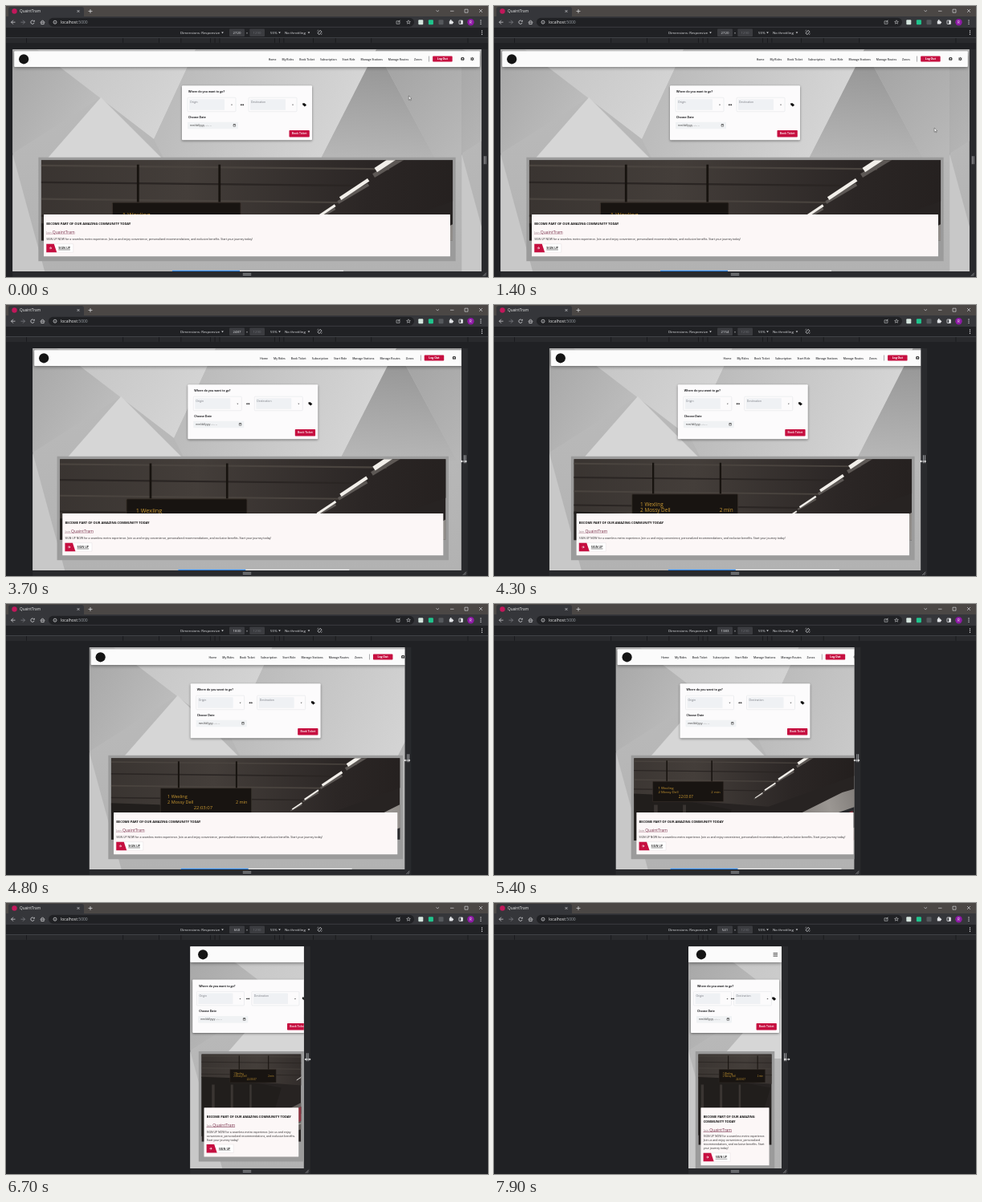
An HTML page with a canvas for the animation above (8000 ms loop, 600 by 338 pixels).

```html
<!DOCTYPE html>
<html lang="en">
<head>
<meta charset="utf-8">
<title>Responsive page preview</title>
<style>
html, body { margin: 0; width: 100%; height: 100%; overflow: hidden; background: #202124; }
canvas { display: block; width: 600px; height: 338px; }
</style>
</head>
<body>
<canvas id="stage"></canvas>
<script>
const BRAND = 'QuaintTram';
const LOOP = 8000, STEP = 100, SCALE = 0.2146, LAG = 150;
const RED = '#c60f40', INK = '#1c1c1f', ICON = '#e2e4e7';
const SANS = '"Open Sans", "Noto Sans", sans-serif';
const canvas = document.getElementById('stage');
const c = canvas.getContext('2d');
const ratio = Math.max(1, window.devicePixelRatio || 1);
canvas.width = 600 * ratio;
canvas.height = 338 * ratio;

const clamp = (v, lo = 0, hi = 1) => Math.min(hi, Math.max(lo, v));
const mix = (a, b, u) => a + (b - a) * u;

// Smooth curve through [time, value] keys, at rest at both ends.
function curve(keys, t) {
  const n = keys.length - 1;
  if (t <= keys[0][0]) return keys[0][1];
  if (t >= keys[n][0]) return keys[n][1];
  const slope = i => i === 0 || i === n ? 0
    : (keys[i + 1][1] - keys[i - 1][1]) / (keys[i + 1][0] - keys[i - 1][0]);
  const i = keys.findIndex(k => k[0] > t) - 1;
  const [a, p] = keys[i], [b, q] = keys[i + 1];
  const h = b - a, u = (t - a) / h, v = 1 - u;
  return p * v * v * (1 + 2 * u) + q * u * u * (1 + 2 * v)
    + h * u * v * (v * slope(i) - u * slope(i + 1));
}

function rect(x, y, w, h, fill, r = 0) {
  c.fillStyle = fill;
  c.beginPath();
  c.roundRect(x, y, w, h, r);
  c.fill();
}
function frame(x, y, w, h, color, lw = 0.5, r = 0) {
  c.strokeStyle = color;
  c.lineWidth = lw;
  c.beginPath();
  c.roundRect(x, y, w, h, r);
  c.stroke();
}
function disc(x, y, r, fill) {
  c.fillStyle = fill;
  c.beginPath();
  c.arc(x, y, r, 0, Math.PI * 2);
  c.fill();
}
function ring(x, y, r, color, from = 0, to = Math.PI * 2) {
  c.strokeStyle = color;
  c.lineWidth = 0.7;
  c.beginPath();
  c.arc(x, y, r, from, to);
  c.stroke();
}
function poly(points, fill) {
  c.fillStyle = fill;
  c.beginPath();
  points.forEach(([x, y]) => c.lineTo(x, y));
  c.closePath();
  c.fill();
}
function line(points, color, lw = 0.7) {
  c.strokeStyle = color;
  c.lineWidth = lw;
  c.beginPath();
  points.forEach(([x, y]) => c.lineTo(x, y));
  c.stroke();
}
function arrow(x, y, r, dir, color) {
  line([[x - r, y], [x + r, y]], color);
  const tip = x + r * dir, back = tip - r * dir;
  line([[back, y - r], [tip, y], [back, y + r]], color);
}
function cross(x, y, r, color) {
  line([[x - r, y - r], [x + r, y + r]], color, 0.6);
  line([[x + r, y - r], [x - r, y + r]], color, 0.6);
}
function caret(x, y, color, r = 1.3) {
  poly([[x - r, y - r / 2], [x + r, y - r / 2], [x, y + r * 0.8]], color);
}
function dots(x, y) {
  for (const d of [-2.2, 0, 2.2]) disc(x, y + d, 0.65, ICON);
}
function grad(x0, y0, x1, y1, ...stops) {
  const g = c.createLinearGradient(x0, y0, x1, y1);
  stops.forEach((s, i) => g.addColorStop(i / (stops.length - 1), s));
  return g;
}
function font(size, weight = 400) {
  c.font = `${weight} ${size}px ${SANS}`;
}
function text(s, x, y, size, color, weight = 400, align = 'left') {
  font(size, weight);
  c.textAlign = align;
  c.fillStyle = color;
  c.fillText(s, x, y + size * 0.36);
  return c.measureText(s).width;
}
function shadowed(blur, draw) {
  c.save();
  c.shadowColor = 'rgba(0,0,0,.45)';
  c.shadowBlur = blur * ratio;
  c.shadowOffsetY = ratio;
  draw();
  c.restore();
}
function clipped(x, y, w, h, draw) {
  c.save();
  c.beginPath();
  c.rect(x, y, w, h);
  c.clip();
  draw();
  c.restore();
}
function wrap(s, width, size, weight) {
  font(size, weight);
  const lines = [];
  let row = '';
  for (const word of s.split(' ')) {
    const next = row ? row + ' ' + word : word;
    if (row && c.measureText(next).width > width) {
      lines.push(row);
      row = word;
    } else row = next;
  }
  return [...lines, row];
}

function tabStrip() {
  rect(0, 0, 600, 14, '#4b4745');
  rect(3, 1, 94, 16, '#35363a', 3);
  disc(10.5, 6.5, 3.2, '#c2185b');
  text(BRAND, 17, 6.5, 4.7, '#eceded');
  cross(90, 6.5, 1.5, ICON);
  line([[102.5, 6.5], [107.5, 6.5]], ICON);
  line([[105, 4], [105, 9]], ICON);
  line([[535.5, 5.3], [537.2, 7], [539, 5.3]], ICON, 0.6);
  line([[553, 6.3], [557.5, 6.3]], ICON, 0.6);
  frame(571, 4.2, 4, 4, ICON, 0.6);
  cross(591, 6, 2, ICON);
}

function addressBar() {
  const y = 20.2;
  rect(0, 13, 600, 14, '#35363a');
  rect(53, 14.7, 455, 11, '#202124', 5.5);
  arrow(9, y, 2.5, -1, ICON);
  arrow(21, y, 2.5, 1, '#85878b');
  ring(33, y, 2.2, ICON, 0.3, 5.4);
  poly([[33.7, y - 0.8], [35.6, y - 0.8], [35.6, y - 2.8]], ICON);
  line([[42.8, y + 0.3], [45.5, y - 2.4], [48.2, y + 0.3]], ICON);
  frame(43.8, y, 3.4, 2.4, ICON, 0.7);
  ring(61, y, 2, ICON);
  line([[61, y - 0.3], [61, y + 1.2]], ICON, 0.5);
  const w = text('localhost', 68, y, 5, '#f1f1f1');
  text(':5000', 68 + w, y, 5, '#9aa0a6');
  frame(486, y - 1.4, 4, 3.5, ICON);
  line([[488, y + 0.4], [490.5, y - 2.5]], ICON, 0.6);
  const star = Array.from({ length: 11 }, (_, i) => {
    const a = i * Math.PI / 5 - Math.PI / 2, r = i % 2 ? 1.1 : 2.5;
    return [501 + r * Math.cos(a), y + r * Math.sin(a)];
  });
  line(star, ICON, 0.5);
  ['#d5e5de', '#20c58d', '#55585c'].forEach((fill, i) => rect(513.3 + i * 12.6, 17.2, 6, 6, fill, 1));
  rect(551.8, 18.5, 4.2, 4, ICON, 0.5);
  disc(553.7, 18, 1, ICON);
  disc(556.3, 20.5, 0.9, ICON);
  frame(564, 18, 4.5, 4.5, ICON, 0.8, 0.4);
  rect(566.2, 18, 2.2, 4.5, ICON);
  disc(578.5, y, 4.2, '#8e1aa5');
  text('R', 578.5, y, 4.5, '#fff', 400, 'center');
  dots(591, y);
}

function deviceBar(width) {
  const y = 33.2, label = (s, x, align) => text(s, x, y, 4.35, ICON, 500, align);
  rect(0, 27, 600, 12.5, '#202124');
  label('Dimensions: Responsive', 217);
  rect(278, 28.5, 19, 9.5, '#3b3c40', 1);
  label(String(Math.round(width)), 287.5, 'center');
  label('×', 300, 'center');
  rect(303.3, 28.5, 18.7, 9.5, '#3b3c40', 1);
  text('1290', 312.5, y, 4.3, '#6c6e73', 400, 'center');
  label('55%', 329);
  label('No throttling', 347);
  for (const x of [269.5, 340.5, 377]) caret(x, y, ICON);
  c.save();
  c.translate(390.5, 33);
  c.rotate(0.7);
  frame(-1.4, -2.4, 2.8, 4.8, ICON, 0.7, 0.5);
  c.restore();
  line([[387.4, 31.3], [389, 29.8]], ICON, 0.5);
  line([[392, 36], [393.6, 34.5]], ICON, 0.5);
  dots(592.5, y);
  rect(0, 39.3, 600, 0.6, '#46484c');
  rect(0, 39.9, 600, 6, '#292a2d');
  for (const px of [320, 375, 425, 768, 1024, 1440, 2560]) {
    const d = px * SCALE / 2;
    rect(300 - d, 40, 0.6, 5.8, '#111214');
    rect(300 + d, 40, 0.6, 5.8, '#111214');
  }
}

// One tile of the faceted grey wall; it repeats to the right.
const TILE = 559;
function wallTile() {
  rect(0, 0, TILE, 277, grad(0, 0, 0, 277, '#bcbcbc', '#b2b2b2'));
  poly([[0, 0], [60, 22], [110, 60], [0, 130]], grad(0, 20, 100, 80, '#a8a8a8', '#bdbdbd'));
  poly([[30, 0], [228, 0], [176, 112]], grad(60, 20, 180, 100, '#c6c6c6', '#d4d4d4'));
  poly([[110, 60], [190, 140], [40, 140]], '#d6d6d6');
  poly([[228, 0], [453, 0], [382, 140], [190, 140], [176, 112]], grad(220, 20, 420, 100, '#bcbcbc', '#d6d6d6'));
  poly([[453, 0], [382, 140], [528, 140]], grad(450, 20, 440, 140, '#979797', '#b7b7b7'));
  poly([[453, 0], [TILE, 0], [TILE, 140], [528, 140]], grad(450, 20, TILE, 120, '#a2a2a2', '#b8b8b8'));
  poly([[0, 130], [40, 277], [0, 277]], '#c8c8c8');
}
function wall(left, w) {
  for (let x = left; x < left + w; x += TILE) {
    c.save();
    c.translate(x, 54);
    wallTile();
    c.restore();
  }
}

function header(left, w) {
  const edge = w > 160 ? 2 : 0, wide = w > 270, right = left + w;
  const y = 54.3 + edge, mid = edge ? 66.3 : 64.3;
  shadowed(4, () => rect(left + edge, y, w - edge * 2, 19.7, '#fbfbfb', 1));
  disc(left + (wide ? 14 : 16), mid, 6.1, '#151515');
  if (!wide) {
    for (const d of [-1.9, 0, 1.9]) rect(right - 10.5, mid + d - 0.4, 5.5, 0.8, '#333');
    return;
  }
  let x = right - 74;
  for (const item of ['Zones', 'Manage Routes', 'Manage Stations', 'Start Ride', 'Subscription',
    'Book Ticket', 'My Rides', 'Home']) x -= text(item, x, mid, 3.4, '#333437', 600, 'right') + 7;
  rect(right - 65.5, mid - 3.8, 0.6, 7, '#77777a');
  rect(right - 60.7, mid - 3.7, 24.5, 7, RED, 0.8);
  text('Log Out', right - 48.5, mid - 0.2, 3.4, '#fff', 700, 'center');
  const user = right - 23.5, gear = right - 11.5, iy = 66;
  disc(user, iy, 2.2, '#333');
  disc(user, iy - 0.6, 0.75, '#fff');
  rect(user - 1.1, iy + 0.7, 2.2, 0.7, '#fff', 0.3);
  for (let i = 0; i < 4; i++) {
    const a = i * Math.PI / 4, dx = 2.2 * Math.cos(a), dy = 2.2 * Math.sin(a);
    line([[gear - dx, iy - dy], [gear + dx, iy + dy]], '#333', 0.9);
  }
  disc(gear, iy, 1.6, '#333');
  disc(gear, iy, 0.7, '#fff');
}

function field(label, x, y, w) {
  frame(x, y, w, 17.5, '#dfe1e4', 0.5, 1);
  rect(x + 2, y + 2, w - 16, 13.5, '#eff1f4', 0.5);
  text(label, x + 3, y + 5.5, 3.4, '#777a80');
  caret(x + w - 5, y + 9, '#444', 1);
}

function booking(left, w, dy) {
  const cw = Math.min(162, w - 6), x = left + (w - cw) / 2, y = 99.2 + dy;
  const roomy = clamp((cw - 110) / 52) ** 2;
  const pad = mix(3.5, 7, roomy), gap = mix(3, 16, roomy);
  const fw = Math.min(60, 47 + (cw - 110) / 3), dw = Math.min(63, 44 + (cw - 110) / 2);
  shadowed(3, () => rect(x, y, cw, dy ? 66.5 : 68, '#fcfbfc', 1));
  text('Where do you want to go?', x + 8, y + 8, 3.5, INK, 700);
  const second = x + pad + fw + gap;
  field('Origin', x + pad, y + 15, fw);
  field('Destination', second, y + 15, fw);
  const mid = second - gap / 2, my = y + 24;
  line([[mid - 1.5, my], [mid + 1.5, my]], '#222');
  for (const s of [-1, 1]) {
    poly([[mid + s * 2.3, my], [mid + s * 0.9, my - 1.2], [mid + s * 0.9, my + 1.2]], '#222');
  }
  const tag = second + fw + gap / 2 + 1.5;
  poly([[tag - 2.3, my - 2], [tag + 0.2, my - 2], [tag + 2.6, my + 0.3], [tag + 0.4, my + 2.4], [tag - 2.3, my]], '#111');
  text('Choose Date', x + 8, y + 39.3, 3.5, INK, 700);
  rect(x + 7, y + 45.5, dw, 8.5, '#f0f2f4', 0.6);
  const tw = text('mm/dd/yyyy', x + 10, y + 49.8, 3.1, '#333');
  text('--:-- --', x + 11 + tw, y + 49.8, 3.1, '#777');
  frame(x + dw + 1, y + 48.4, 2.6, 2.6, '#333');
  rect(x + dw + 1, y + 48.2, 2.6, 0.9, '#333');
  const by = y + (dy ? 54.5 : 55.7);
  rect(x + cw - 28.5, by, 25.3, 8.6, RED, 0.8);
  text('Book Ticket', x + cw - 15.8, by + 4.3, 3.4, '#fff', 600, 'center');
}

// Dim station hall around a departure board, in flat shapes.
function photo(x, y, w, h, W) {
  const k = Math.max(0.5, W / 420);
  const u = curve([[116, 0.6], [155, 0.51], [231, 0.2], [419, 0.33]], W);
  clipped(x, y, w, h, () => {
    rect(x, y, w, h, '#272322');
    c.translate(x + w * u, y + 54 * k);
    c.scale(k, k);
    poly([[-200, -90], [450, -90], [130, 25], [-200, 0]],
      grad(-150, -50, 330, -20, '#37322f', '#443e3a', '#2b2625', '#1f1b1a'));
    for (let i = 0; i < 4; i++) {
      line([[-200, i * 15 - 50], [190 - i * 22, i * 15 - 46]], i % 2 ? '#2a2523' : '#4a443f', 1.6);
    }
    poly([[-200, 0], [-60, 5], [70, 30], [40, 130], [-200, 160]], '#211e1c');
    for (let i = 0; i < 4; i++) rect(i * 47 - 150, 22, 8 - i, 70, '#3a3532');
    poly([[78, 88], [250, 2], [420, -50], [420, 60], [86, 142]],
      grad(90, 90, 380, 0, '#5b5653', '#9b9793', '#4c4846'));
    poly([[90, 88], [400, -20], [400, 28], [94, 101]], '#292a2d');
    for (let i = 0; i < 7; i++) {
      const d = 112 + i * 36, top = 80 - i * 11;
      poly([[d, top], [d + 11, top - 4], [d + 12, top + 32 + i * 4], [d + 1, top + 35 + i * 4]],
        i % 3 === 2 ? '#aaa5a0' : '#8b3440');
    }
    line([[83, 128], [410, 45]], '#b5b2ae', 2);
    // Lamps shrink toward the vanishing point.
    for (let i = 0; i < 4; i++) {
      const s = 0.7 ** i, lx = 72 + 106 * s, ly = 40 - 85 * s;
      line([[lx - 2, ly + 5 * s], [lx + 36 * s, ly - 18 * s]], '#5d5855', 4 * s);
      line([[lx, ly], [lx + 36 * s, ly - 24 * s]], '#f2efea', 4.5 * s);
    }
    for (const px of [-35, 38]) line([[px, -50], [px, -14]], '#17130f', 2);
    rect(-58, -16, 115, 33, '#181411', 1);
    frame(-58, -16, 115, 33, '#3d352f', 0.7, 1);
    const amber = '#c99832';
    text('1 Wexling', -49, -5, 5.6, amber);
    text('2 Mossy Dell', -49, 1.5, 5.6, amber);
    text('2 min', 37, 1.5, 5.6, amber);
    text('22:03:07', -16, 9, 6, amber);
  });
}

function community(left, w, dy) {
  const m = 3 + w * 0.05, x = left + m, sw = w - m * 2, top = 188.8 + dy;
  const bx = x + 6.7, bw = sw - 13.4, by = dy ? 255.2 : 260, tx = bx + 3.2;
  const head = wrap('BECOME PART OF OUR AMAZING COMMUNITY TODAY', bw - 6, 4, 700);
  const body = wrap('SIGN UP NOW for a seamless metro experience. Join us and enjoy convenience, ' +
    'personalized recommendations, and exclusive benefits. Start your journey today!', bw - 6, 3.45);
  const headY = by + 11.2, joinY = headY + head.length * 5.7 + 5;
  const bodyY = joinY + (body.length > 1 ? 8.2 : 9);
  const btnY = bodyY + body.length * 5 + 0.8, end = btnY + 15.5, ay = btnY + 5.2;
  rect(x, top, sw, end + 6 - top, '#9b9b9b');
  photo(x + 3.6, top + 3.4, sw - 7.2, 97 + 1900 / w, w);
  rect(bx, by, bw, end - by, '#fcf7f7', 0.5);
  head.forEach((s, i) => text(s, tx, headY + i * 5.7, 4, '#111', 700));
  let jw = text('Join ', tx, joinY + 0.4, 4, '#6d4652', 300);
  jw += text(BRAND, tx + jw, joinY, 5, '#772d48');
  rect(tx, joinY + 2.5, jw, 0.4, '#772d48');
  body.forEach((s, i) => text(s, tx, bodyY + i * 5, 3.45, '#29282a'));
  rect(tx, btnY, 33.5, 10.5, '#fff');
  frame(tx, btnY, 33.5, 10.5, '#e5dfe0');
  poly([[tx, btnY], [tx + 9.5, btnY], [tx + 13, btnY + 10.5], [tx, btnY + 10.5]], RED);
  arrow(tx + 5, ay, 1.4, 1, '#fff');
  const uw = text('SIGN UP', tx + 15, ay, 3.7, '#151515', 600);
  rect(tx + 15, ay + 1.9, uw, 0.4, '#151515');
  if (w > 300) {
    const cx = left + w / 2 - 93;
    rect(cx, 329.7, 213, 2, '#eeeeee');
    rect(cx, 329.7, 84, 2, '#2f86e6');
  }
}

function page(width, layout) {
  const w = width * SCALE, left = 300 - w / 2, right = left + w;
  const lw = layout * SCALE, dy = lw < 165 ? -3.8 : 0, grey = '#b9bbbe';
  rect(0, 46, 600, 292, '#202124');
  rect(right, 54, 8, 277, '#292a2d');
  rect(left, 331, w + 8, 7, '#292a2d');
  clipped(left, 54, w, 277, () => {
    wall(left, w);
    header(left, lw);
    booking(left, lw, dy);
    community(left, lw, dy);
  });
  for (const d of [0, 1.9]) {
    rect(294.8, 333.4 + d, 10.4, 0.8, grey);
    rect(right + 3 + d, 187.3, 0.8, 10, grey);
    line([[right + 2 + d, 336.8], [right + 6, 332.8 + d]], grey, 0.6);
  }
  return right;
}

function pointer(t, right) {
  if (t < 1800) {
    const u = clamp((t - 1000) / 800), x = mix(501.3, 595, u), y = mix(112, 192, u);
    const tip = [[0, 0], [0, 5.2], [1.2, 4.1], [2, 5.9], [2.9, 5.5], [2.1, 3.8], [3.7, 3.7], [0, 0]];
    const shape = tip.map(([a, b]) => [x + a, y + b]);
    poly(shape, '#fff');
    line(shape, '#222', 0.4);
    return;
  }
  const x = right + mix(3, 6.5, clamp((t - 5900) / 1600));
  const y = mix(192, 195, clamp((t - 2900) / 800));
  line([[x - 2.5, y], [x + 2.5, y]], '#fff');
  for (const s of [-1, 1]) poly([[x + s * 4, y], [x + s * 2, y - 1.4], [x + s * 2, y + 1.4]], '#fff');
}

// Width of the emulated screen while its edge is dragged.
const drag = [[2900, 2720], [3700, 2487], [4800, 1830], [5900, 1027], [6700, 660], [7500, 541]];

function draw(now) {
  const t = Math.floor(now % LOOP / STEP) * STEP;
  const width = curve(drag, t);
  c.setTransform(ratio, 0, 0, ratio, 0, 0);
  // The content reflows a moment after the screen shrinks.
  const right = page(width, curve(drag, t - LAG));
  tabStrip();
  addressBar();
  deviceBar(width);
  pointer(t, right);
}

let start;
function tick(now) {
  start ??= now;
  draw(now - start);
  requestAnimationFrame(tick);
}
requestAnimationFrame(tick);
</script>
</body>
</html>
```
